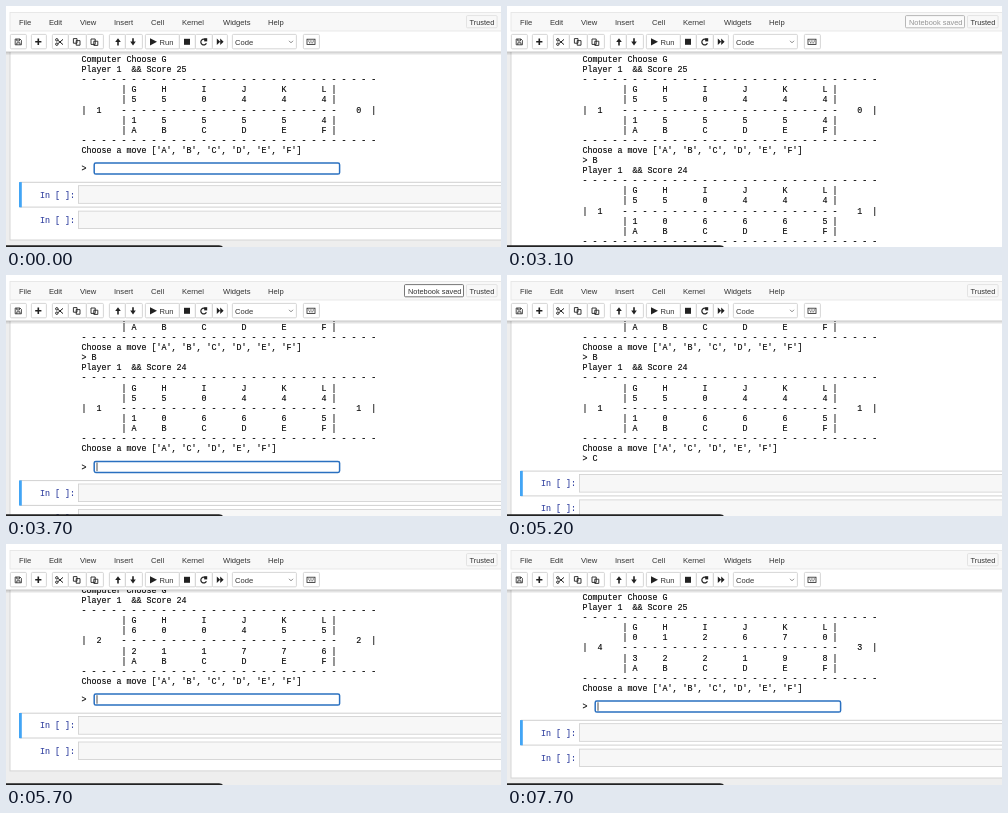
Recreate the animation shown at these times as an HTML page. Size 495x241 px, loop 8000 ms.

```html
<!DOCTYPE html>
<html lang="en">
<head>
<meta charset="utf-8">
<title>Board game in a notebook</title>
<style>
html, body { margin: 0; width: 100%; height: 100%; overflow: hidden; background: #eee; }
svg { display: block; width: 495px; height: 241px; }
text { white-space: pre; }
.mono { font: 8.333px "Liberation Mono", "DejaVu Sans Mono", monospace; }
.out { fill: #000; stroke: #000; stroke-width: .12px; }
.prompt { fill: #303f9f; stroke: #303f9f; stroke-width: .1px; }
.ui { font: 7.6px "Liberation Sans", Arial, sans-serif; fill: #333; }
.btn { fill: #fff; stroke: #ccc; stroke-width: .8px; }
.icon { fill: #222; }
.line { fill: none; stroke: #222; stroke-width: 1px; }
.cell { fill: #f7f7f7; stroke: #cfcfcf; stroke-width: .8px; }
</style>
</head>
<body>
<svg viewBox="0 0 495 241">
  <defs>
    <clipPath id="view"><rect y="46" width="495" height="195"/></clipPath>
    <linearGradient id="shade" x2="0" y2="1">
      <stop stop-color="#000" stop-opacity=".22"/>
      <stop offset="1" stop-color="#000" stop-opacity="0"/>
    </linearGradient>
  </defs>

  <g clip-path="url(#view)">
    <rect id="page" x="4" y="40" width="500" fill="#fff" stroke="#d5d5d5" stroke-width="1"/>
    <g id="log" class="mono out"></g>
    <g id="entry">
      <text class="mono out" x="75.5" y="3">&gt;</text>
      <rect x="88.2" y="-5.2" width="245.4" height="11" rx="1.6" fill="#fff" stroke="#2a70c0" stroke-width="1.5"/>
      <text id="typed" class="mono out" x="91" y="3.2"></text>
      <path id="caret" d="M0-4V4.5" stroke="#222" stroke-width=".8"/>
    </g>
    <g id="cells">
      <path d="M14-12.2H500M14 12.6H500" stroke="#c4c4c4" stroke-width=".8"/>
      <rect x="13" y="-12.4" width="2.8" height="25.2" fill="#42a5f5"/>
      <rect class="cell" x="72.4" y="-8.8" width="430" height="17.6"/>
      <text class="mono prompt" x="34" y="3">In [ ]:</text>
      <rect class="cell" x="72.4" y="16.6" width="430" height="17.4"/>
      <text class="mono prompt" x="34" y="28.2">In [ ]:</text>
    </g>
  </g>

  <rect width="495" height="46" fill="#fff"/>
  <rect x="4" y="6.4" width="500" height="18.6" fill="#f8f8f8" stroke="#e4e4e4" stroke-width=".8"/>
  <rect y="45.5" width="495" height="4" fill="url(#shade)"/>
  <g id="menu" class="ui"></g>
  <g id="saved">
    <rect x="398.5" y="9.6" width="59" height="12.2" rx="1" fill="#fff" stroke="#555" stroke-width=".8"/>
    <text class="ui" x="402" y="18.7" style="font-size:7.4px">Notebook saved</text>
  </g>
  <rect x="460.5" y="9.6" width="30.6" height="12.2" rx="1" fill="#f8f8f8" stroke="#ddd" stroke-width=".8"/>
  <text class="ui" x="463.5" y="18.7" style="font-size:7.4px">Trusted</text>

  <g id="buttons"></g>
  <g class="icon">
    <path d="M29.2 35h2.3v-2.5h1.6V35h2.3v1.6h-2.3v2.5h-1.6v-2.5h-2.3z"/>
    <path d="M109.2 36L112 32.2 114.8 36H112.8V39.5H111.2V36z"/>
    <path d="M124.2 35.6L127 39.4 129.8 35.6H127.8V32.2H126.2V35.6z"/>
    <path d="M144 32.2L151 35.8 144 39.4z"/>
    <rect x="178" y="32.8" width="6" height="6"/>
    <path d="M210.8 32.6L214.2 35.8 210.8 39zM214.2 32.6L217.6 35.8 214.2 39z"/>
    <path d="M198.2 32.2h3v3.2h-3z"/>
  </g>
  <g class="line">
    <path d="M9.2 33h4.8l1.4 1.4v4.4h-6.2zM10.8 33v2h2.6v-2M10.8 38.8v-2h3.2v2" stroke-width=".8"/>
    <path d="M52 34.4L57 38.6M52 37.6L57 33.4"/>
    <circle cx="50.8" cy="33.8" r="1.2"/><circle cx="50.8" cy="38.2" r="1.2"/>
    <path d="M67.4 32.6h3.6v4.6h-3.6zM70.2 34.6h3.8v4.6h-3.8z" stroke-width=".9"/>
    <path d="M85 33h4.2v5.4H85zM87.8 35.2h4v4.2h-4z" stroke-width=".9"/>
    <path d="M200 34.2A2.9 2.9 0 1 0 200.4 37.2" stroke-width="1.2"/>
    <path d="M283 34.8l2 2 2-2" stroke="#666" stroke-width=".8"/>
    <rect x="301" y="33.2" width="8" height="5.2" stroke-width=".8"/>
    <path d="M302.2 35h5.8M303 36.8h4.2" stroke-width=".8" stroke-dasharray="1 .6"/>
  </g>
  <text class="ui" x="153.5" y="38.6">Run</text>
  <text class="ui" x="229" y="39">Code</text>
  <path d="M0 239.2H213q3 0 4 1.8H0z" fill="#222"/>
</svg>

<script>
const $ = id => document.getElementById(id);
const PITCH = 10.1, FIRST = 53;

function add(parent, tag, attrs, text = '') {
  const el = document.createElementNS('http://www.w3.org/2000/svg', tag);
  for (const key in attrs) el.setAttribute(key, attrs[key]);
  el.textContent = text;
  return parent.appendChild(el);
}

// Toolbar and menu
Object.entries({ File: 13, Edit: 43, View: 74, Insert: 108, Cell: 145, Kernel: 176, Widgets: 217, Help: 262 })
  .forEach(([name, x]) => add($('menu'), 'text', { x, y: 18.6 }, name));
[[4, 20], [25, 40], [46, 62], [62, 80], [80, 97], [103, 119], [119, 136],
 [139, 173], [173, 189], [189, 206], [206, 221], [226, 290], [297, 313]]
  .forEach(([a, b]) => add($('buttons'), 'rect',
    { class: 'btn', x: a + .4, y: 28.4, width: b - a, height: 14.4, rx: 1 }));

// Transcript: each character is put at its own column
function row(marks) {
  const chars = Array(59).fill(' ');
  marks.forEach(([col, ch]) => chars[col] = ch);
  return chars.join('').trimEnd();
}
const PITS = [10, 16, 24, 32, 40, 48];
const pits = values => row([[8, '|'], ...PITS.map((col, i) => [col, values[i]]), [50, '|']]);
const dashes = (from, to) =>
  Array.from({ length: (to - from) / 2 + 1 }, (_, i) => [from + 2 * i, '-']);

function board(player, score, top, bottom, left, right) {
  const edge = row(dashes(0, 58));
  return [
    `Player ${player}  && Score ${score}`, edge, pits('GHIJKL'), pits(top),
    row([[0, '|'], [3, left], ...dashes(8, 50), [55, right], [58, '|']]),
    pits(bottom), pits('ABCDEF'), edge
  ];
}
function turn(score, top, bottom, left, right) {
  const moves = [...'ABCDEF'].filter((_, i) => bottom[i] !== '0').map(c => `'${c}'`);
  return [...board(1, score, top, bottom, left, right), `Choose a move [${moves.join(', ')}]`];
}
const reply = 'Computer Choose G';
const lines = [
  reply, ...turn(25, '550444', '155554', 1, 0),
  '> B', ...turn(24, '550444', '106665', 1, 1),
  '> C', ...board(2, 23, '550455', '100776', 1, 2),
  reply, ...turn(24, '600455', '211776', 2, 2),
  '> D', ...board(2, 23, '601566', '211087', 2, 3),
  reply, ...board(2, 22, '712670', '211087', 3, 3),
  reply, ...turn(25, '012670', '322198', 4, 3)
];
const rows = lines.map((line, i) =>
  add($('log'), 'text', { x: 75.5, y: FIRST + 3 + i * PITCH }, line));

// Each step changes some of the state from its time on
const steps = [
  [0, { count: 10, input: true, text: '', caret: false, scroll: 0, saved: 0 }],
  [500, { caret: true }],
  [1000, { caret: false }],
  [1200, { text: 'b', caret: true }],
  [1600, { text: '' }],
  [1900, { text: 'B' }],
  [2300, { count: 20, text: '' }],
  [3100, { saved: .5 }],
  [3200, { saved: 1 }],
  [3500, { scroll: 20 }],
  [3600, { scroll: 56 }],
  [3700, { scroll: 71.7 }],
  [4300, { caret: false }],
  [4500, { text: 'C', caret: true }],
  [5100, { count: 21, input: false, text: '', saved: .4 }],
  [5200, { saved: 0 }],
  [5300, { count: 39, input: true }],
  [5600, { scroll: 190 }],
  [5700, { scroll: 300 }],
  [6300, { caret: false }],
  [6800, { caret: true }],
  [6900, { text: 'D' }],
  [7400, { count: 40, input: false, text: '' }],
  [7500, { count: 67, input: true }],
  [7600, { scroll: 470 }],
  [7700, { scroll: 575.7 }]
];

const moveTo = (id, y) => $(id).setAttribute('transform', `translate(0 ${y})`);
let shown = -1;

function draw(now) {
  requestAnimationFrame(draw);
  const time = now % 8000;
  const past = steps.filter(([at]) => at <= time);
  if (past.length === shown) return;
  shown = past.length;

  const s = Object.assign({}, ...past.map(([, change]) => change));
  const last = FIRST + (s.count - 1) * PITCH - s.scroll;
  const cellY = last + (s.input ? 44.6 : 25);
  rows.forEach((el, i) => el.style.display = i < s.count ? '' : 'none');
  moveTo('log', -s.scroll);
  moveTo('entry', last + 18.4);
  moveTo('cells', cellY);
  $('page').setAttribute('height', cellY + 45.5 - 40);
  $('entry').style.display = s.input ? '' : 'none';
  $('typed').textContent = s.text;
  $('caret').style.display = s.caret ? '' : 'none';
  $('caret').setAttribute('transform', `translate(${91 + 5.2 * s.text.length} 0)`);
  $('saved').style.opacity = s.saved;
}
draw(performance.now());
</script>
</body>
</html>
```
